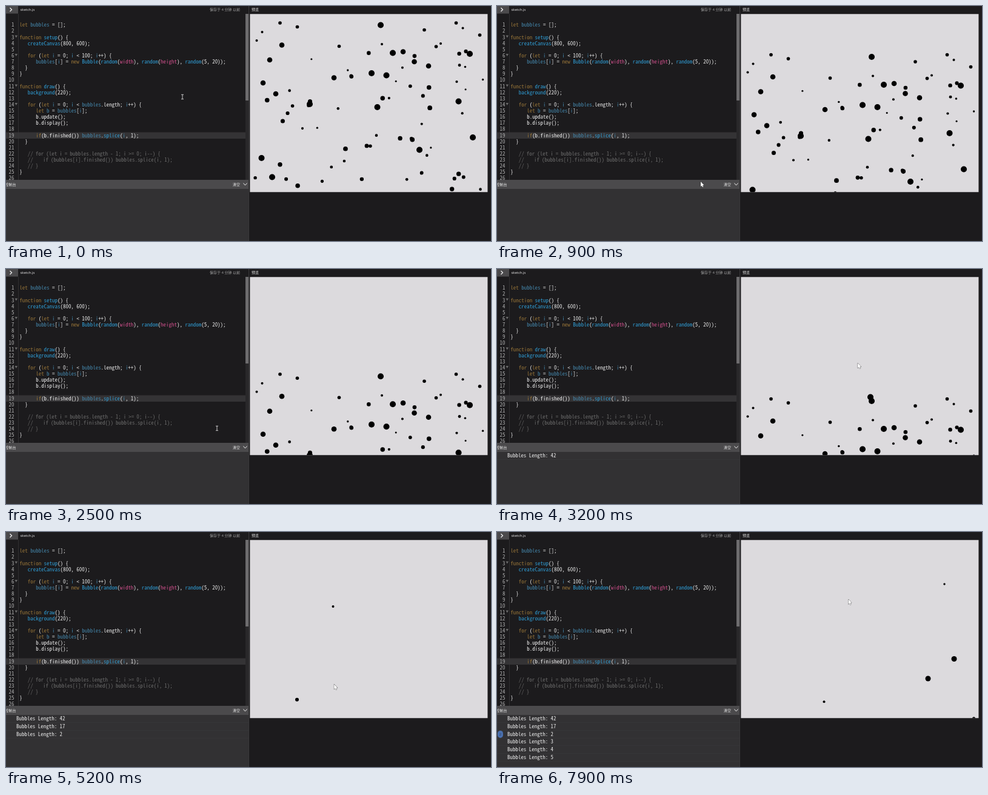
Write an HTML page with a canvas that moves like this. It is 800 px wide and 388 px high and loops after 8000 ms.

```html
<!DOCTYPE html>
<html lang="zh">
<head>
<meta charset="utf-8">
<style>
html, body { margin: 0; width: 100%; height: 100%; overflow: hidden; background: #1c1b1d; }
canvas { display: block; }
</style>
</head>
<body>
<canvas id="stage" width="800" height="388"></canvas>
<script>
const g = document.getElementById('stage').getContext('2d');
const SANS = '6px "Open Sans", "Noto Sans CJK SC", "Noto Sans CJK", sans-serif';
const MONO = '"Noto Sans Mono CJK SC", "Liberation Mono", monospace';
const ADVANCE = 4.48, LINE = 10.125, SPEED = 0.0583;
const WHITE = '#ececec', GOLD = '#957338', BLUE = '#2f9bd2', DIM_BLUE = '#4384a8', PINK = '#cf4f8b', GREY = '#6a6a6a';

const code = `let bubbles = [];

function setup() {
   createCanvas(800, 600);

   for (let i = 0; i < 100; i++) {
      bubbles[i] = new Bubble(random(width), random(height), random(5, 20));
  }
}

function draw() {
   background(220);

   for (let i = 0; i < bubbles.length; i++) {
      let b = bubbles[i];
      b.update();
      b.display();

      if(b.finished()) bubbles.splice(i, 1);
  }

   // for (let i = bubbles.length - 1; i >= 0; i--) {
   //    if (bubbles[i].finished()) bubbles.splice(i, 1);
   // }
}
`.split('\n');

const bubbles = [];
const add = (r, born, ...points) => points.forEach(([x, y]) => bubbles.push({ x, y, r, born }));

// The most visible bubbles; the others are scattered at random
add(5, 0, [618, 31.5], [638, 77.5], [765, 79], [603, 111], [627.5, 114.5], [501, 162],
  [612.5, 167], [682, 237.5], [770, 217], [421.5, 251], [439, 282.5], [746.5, 157.5]);
add(4.3, 0, [455, 64.5], [655, 75.5], [435, 89], [673.5, 92], [697, 99], [541, 118.5], [424, 127], [445, 145]);
add(2.8, 0, [452, 28], [480.5, 34.5], [690, 39.5], [742.5, 28], [781.5, 48], [549.5, 66.5], [709.5, 67]);
add(2, 0, [422.5, 43], [413.5, 57], [620, 63], [753.5, 36.5], [717, 62]);

let seed = 7;
const random = (a, b) => a + (b - a) * (seed = seed * 16807 % 2147483647) / 2147483647;
for (let i = 0; i < 58; i++) add(random(1.5, 4), 0, [random(410, 788), random(70, 304)]);

// Each click drops a bubble and logs the count
const clicks = [
  { t: 2900, x: 616, y: 194, r: 5, count: 42 },
  { t: 4000, x: 539.5, y: 53, r: 2, count: 17 },
  { t: 5000, x: 480, y: 265, r: 3, count: 2 },
  { t: 6000, x: 786.5, y: 197, r: 2.5, count: 2 },
  { t: 6700, x: 711, y: 172, r: 4.5, count: 3 },
  { t: 7000, x: 754, y: 157, r: 4.5, count: 4 },
  { t: 7300, x: 738, y: 51, r: 1.7, count: 5 }
];
for (const { t, x, y, r } of clicks) add(r, t, [x, y]);

// The mouse visits the clicks and a few stops between them
const stop = (t, x, y) => ({ t, x, y });
const path = [
  stop(0, 291, 150), stop(900, 336, 290), stop(1700, 321, 324), stop(2500, 348, 263),
  stop(4100, 566.5, 74), stop(6400, 619, 86), stop(7900, 579.5, 111), ...clicks
].sort((a, b) => a.t - b.t);

function mouseAt(t) {
  const i = Math.max(1, path.findIndex(p => p.t >= t));
  const a = path[i - 1], b = path[i], u = (t - a.t) / (b.t - a.t);
  return [a.x + (b.x - a.x) * u, a.y + (b.y - a.y) * u];
}

function box(x, y, w, h, color) {
  g.fillStyle = color;
  g.fillRect(x, y, w, h);
}

function text(s, x, y, color, font = SANS, align = 'left') {
  g.font = font;
  g.fillStyle = color;
  g.textAlign = align;
  g.fillText(s, x, y);
}

function line(points, color, width) {
  g.strokeStyle = color;
  g.lineWidth = width;
  g.beginPath();
  points.forEach(p => g.lineTo(...p));
  g.stroke();
}

function clipped(x, y, w, h, draw) {
  g.save();
  g.beginPath();
  g.rect(x, y, w, h);
  g.clip();
  draw();
  g.restore();
}

g.font = '100px ' + MONO;
const mono = ADVANCE * 100 / g.measureText('0').width + 'px ' + MONO;

function colorOf(token) {
  if (/^\/\//.test(token)) return GREY;
  if (/^(let|function|for|new|if)$/.test(token)) return GOLD;
  if (/^(width|height)$/.test(token)) return PINK;
  if (/^(bubbles|i|b)$/.test(token)) return DIM_BLUE;
  return /^[a-z]\w*$/i.test(token) && token !== 'length' ? BLUE : WHITE;
}

function drawCode() {
  box(0, 208.5, 395, 10.5, '#343335');
  box(20, 13, 0.7, 274, '#3a393b');
  g.wordSpacing = '-0.4px';
  code.forEach((row, n) => {
    const y = 34.3 + n * LINE, words = row.trimStart();
    text(n + 1, 13.5, y, '#b0b0b0', mono, 'right');
    let x = 22.3 + (row.length - words.length) * ADVANCE;
    for (const [token] of words.matchAll(/\/\/.*|b\.\w+|\w+|\s+|[^\w\s]+/g)) {
      text(token, x, y, colorOf(token), mono);
      x += g.measureText(token).width;
    }
    if (/^(function|for)/.test(words)) {
      g.fillStyle = '#6b6b6b';
      g.beginPath();
      g.moveTo(14.5, y - 6);
      g.lineTo(19, y - 6);
      g.lineTo(16.75, y - 2);
      g.fill();
    }
  });
}

function drawConsole(t) {
  box(0, 287, 400, 15, '#4b4a4c');
  box(0, 302, 400, 86, '#323133');
  text('控制台', -1.5, 296.5, WHITE);
  text('清空', 374, 296.5, WHITE);
  line([[391.5, 292.5], [394.5, 296], [397.5, 292.5]], WHITE, 1);
  const rows = new Map();
  for (const c of clicks) if (t >= c.t) rows.set(c.count, (rows.get(c.count) || 0) + 1);
  let y = 308.5;
  for (const [count, times] of rows) {
    box(0, y + 6, 400, 0.5, '#3b3a3c');
    text('Bubbles Length: ' + count, 17, y + 2.8, WHITE, mono);
    if (times > 1) {
      g.fillStyle = '#4a70ae';
      g.beginPath();
      g.roundRect(1, y - 6, 9, 12, 4.5);
      g.fill();
      text(times, 5.5, y + 2.3, '#27395a', SANS, 'center');
    }
    y += 12.7;
  }
}

function drawBubbles(t) {
  box(402, 13, 393, 295, '#dcdadd');
  g.fillStyle = '#000';
  for (const b of bubbles) {
    if (t < b.born) continue;
    g.beginPath();
    g.arc(b.x, b.y + (t - b.born) * SPEED, b.r, 0, 7);
    g.fill();
  }
}

function drawMouse(t) {
  const [x, y] = mouseAt(t);
  if (x < 395 && y > 13 && y < 287) {
    line([[x, y - 3.5], [x, y + 3.5]], '#ddd', 0.9);
    for (const end of [y - 3.7, y + 3.7]) line([[x - 2, end], [x + 2, end]], '#ddd', 0.9);
    return;
  }
  const arrow = [[0, 0], [0, 8.2], [1.8, 6.5], [3.1, 9.2], [4.4, 8.6], [3.2, 6], [5.5, 5.8], [0, 0]];
  line(arrow.map(([dx, dy]) => [x + dx, y + dy]), '#222', 0.7);
  g.fillStyle = '#fff';
  g.fill();
}

function frame() {
  const t = Math.floor(performance.now() % 8000 / 100) * 100;
  g.wordSpacing = '0px';
  box(0, 0, 800, 388, '#1c1b1d');
  box(0, 0, 20, 12.5, '#4b4a4c');
  line([[6.5, 3], [9.5, 6], [6.5, 9]], WHITE, 1.3);
  text('sketch.js', 23.5, 8, WHITE);
  text('保存于 4 分钟 以前', 386, 8, '#a5a5a5', SANS, 'right');
  text('预览', 405, 8, WHITE);
  clipped(0, 13, 400, 274, drawCode);
  drawConsole(t);
  box(395, 13, 5, 274, '#29282a');
  box(395, 13, 5, 143, '#6d6c6e');
  box(400, 0, 1, 388, '#3a393b');
  clipped(402.4, 13.2, 392, 294, () => drawBubbles(t));
  drawMouse(t);
  requestAnimationFrame(frame);
}
frame();
</script>
</body>
</html>
```
